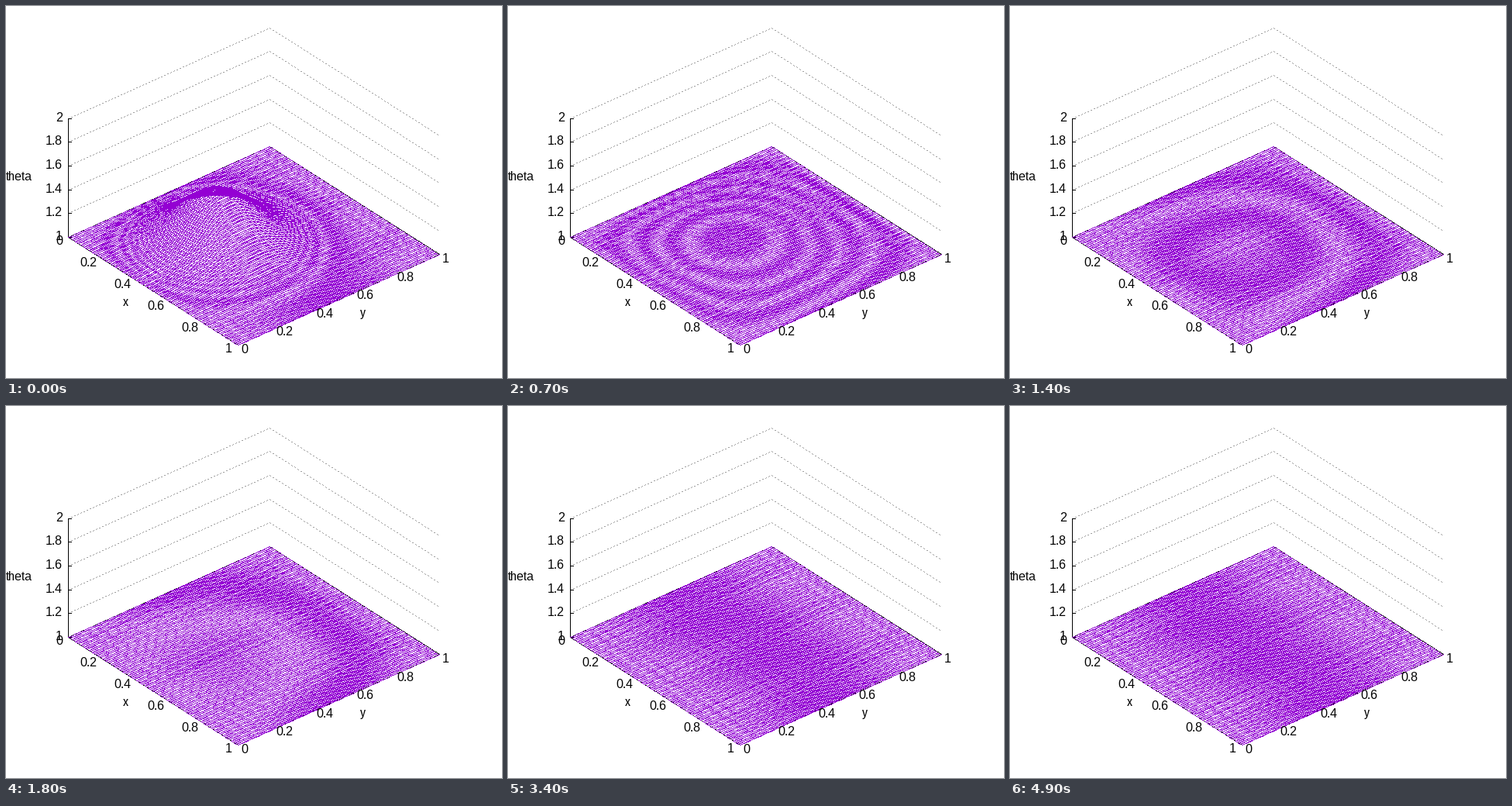
A matplotlib script for the animation above (5 s loop, 640x480 px).

```python
import numpy as np
import matplotlib.pyplot as plt
from matplotlib.animation import FuncAnimation

plt.rcParams.update({"text.hinting": "native", "text.hinting_factor": 1})

WIDTH, HEIGHT, DPI = 640, 480, 100
FRAMES, INTERVAL = 50, 100
CELLS = 100
PURPLE, BLACK, GRAY = (148, 0, 211), (0, 0, 0), (160, 160, 160)

# View: rotation about z, then the screen length of a unit in each direction
COS, SIN = np.cos(np.radians(50)), np.sin(np.radians(50))
SCALE_X, SCALE_Y, SCALE_Z = 339.5, 182, 153.3
BASE_X, BASE_Y = 320, 308.7

# Heat spreading from a Gaussian spot in a unit square with cold walls
CENTER, SIGMA, HEAT = 0.4, 0.15, 0.064
DIFFUSIVITY = 1.57 / (2 * np.pi ** 2)
MODES = np.arange(1, 13)[:, None]

axis = np.linspace(0, 1, CELLS + 1)
grid_x, grid_y = np.meshgrid(axis, axis, indexing="ij")


def to_pixels(x, y, z=1.0):
    """Pixel (y down) of a point in the plot's box."""
    u, v = x - 0.5, y - 0.5
    sx = BASE_X + SCALE_X * (COS * u + SIN * v)
    sy = BASE_Y + SCALE_Y * (SIN * u - COS * v) - SCALE_Z * (z - 1)
    sx, sy = np.broadcast_arrays(np.floor(sx), np.ceil(sy))
    return np.stack([sx, sy], axis=-1).astype(int)


def draw_lines(image, start, end, color, dash=None):
    """Draw one-pixel lines without smoothing."""
    start, end = np.atleast_2d(start), np.atleast_2d(end)
    steps = np.maximum(np.abs(end - start).max(axis=1), 1)
    k = np.arange(steps.max() + 1)[:, None]
    part = np.minimum(k / steps, 1)[..., None]
    points = np.floor(start + part * (end - start) + 0.5).astype(int)
    if dash:
        points = points[k[:, 0] % sum(dash) < dash[0]]
    image[points[..., 1], points[..., 0]] = color


def theta(seconds):
    spread = SIGMA ** 2 + 2 * DIFFUSIVITY * seconds
    waves = 2 * np.sin(MODES * np.pi * CENTER) * np.sin(MODES * np.pi * axis)
    profile = (waves * np.exp(-(MODES * np.pi) ** 2 * spread / 2)).sum(axis=0)
    return 1 + HEAT * np.outer(profile, profile)


def make_background():
    image = np.full((HEIGHT, WIDTH, 3), 255, np.uint8)
    for z in np.linspace(1.2, 2, 5):
        left, back, right = (to_pixels(*p, z) for p in [(0, 0), (0, 1), (1, 1)])
        draw_lines(image, left, back, GRAY, (2, 2))
        draw_lines(image, back, right, GRAY, (2, 2))
    corners = to_pixels(np.array([0, 1, 1, 0]), np.array([0, 0, 1, 1]))
    draw_lines(image, corners, np.roll(corners, -1, axis=0), BLACK)
    draw_lines(image, to_pixels(0, 0, 1), to_pixels(0, 0, 2), BLACK)
    for z in np.linspace(1, 2, 6):
        tick = to_pixels(0, 0, z)
        draw_lines(image, tick, tick + [4, 0], BLACK)
    # The trace runs back from the end of each row to the start of the next
    draw_lines(image, to_pixels(axis[:-1], 1.0), to_pixels(axis[1:], 0.0), PURPLE)
    return image


background = make_background()


def render(frame):
    image = background.copy()
    nodes = to_pixels(grid_x, grid_y, theta(frame * INTERVAL / 1000))
    draw_lines(image, nodes[:, :-1].reshape(-1, 2),
               nodes[:, 1:].reshape(-1, 2), PURPLE)
    return image


fig = plt.figure(figsize=(WIDTH / DPI, HEIGHT / DPI), dpi=DPI, facecolor="white")
ax = fig.add_axes([0, 0, 1, 1])
ax.axis("off")
picture = ax.imshow(render(0), extent=(0, WIDTH, HEIGHT, 0),
                    interpolation="nearest", aspect="auto")


def label(x, y, text, align="center"):
    ax.text(x, y, text, ha=align, va="baseline", color="black",
            family="Liberation Sans", fontsize=16 * 72 / DPI)


for value in np.linspace(0, 1, 6):
    sx, sy = to_pixels(value, 0)
    label(sx - 7, sy + 10, f"{value:.1g}", "right")
    sx, sy = to_pixels(1, value)
    label(sx + 8.5, sy + 11, f"{value:.1g}")
    sx, sy = to_pixels(0, 0, 1 + value)
    label(sx - 7, sy + 4, f"{1 + value:.2g}", "right")
label(154, 387, "x")
label(460, 401, "y")
label(0, 225, "theta", "left")


def update(frame):
    picture.set_data(render(frame))
    return [picture]


animation = FuncAnimation(fig, update, frames=FRAMES, interval=INTERVAL,
                          repeat=True, repeat_delay=0)
plt.show()
```
